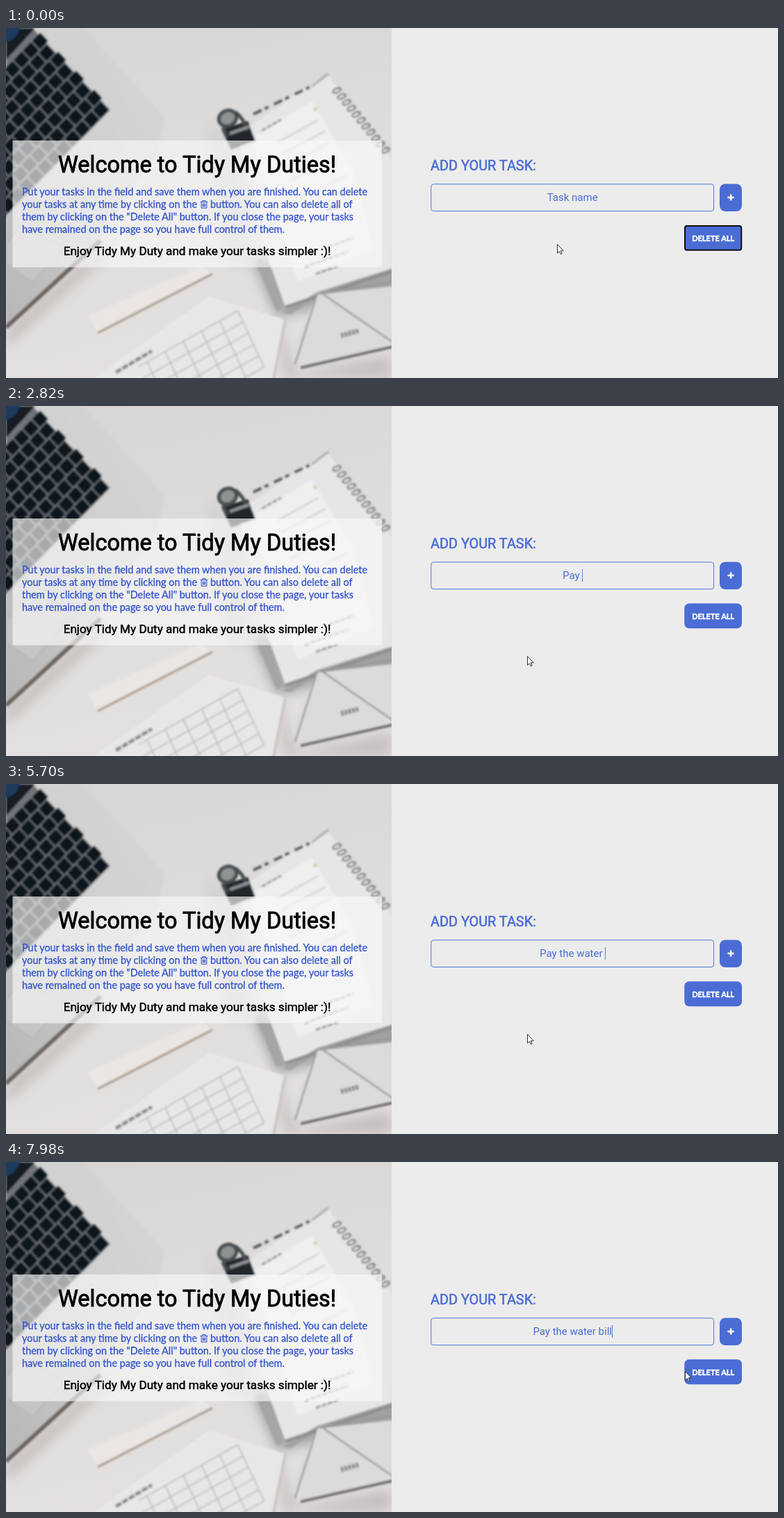
Animation of 1111 by 504 pixels, one loop 8 s. Source, as an HTML page:

```html
<!DOCTYPE html>
<html lang="en">
<head>
<meta charset="utf-8">
<title>Task list</title>
<style>
html, body { margin: 0; width: 100%; height: 100%; overflow: hidden; background: #ececec; }
svg { display: block; width: 1111px; height: 504px; }
text { white-space: pre; }
.rob { font-family: Roboto, sans-serif; }
.lato { font-family: Lato, sans-serif; }
.title { font-size: 32.5px; text-anchor: middle; stroke: #000; stroke-width: .85px; }
.foot { font-size: 17.15px; text-anchor: middle; stroke: #000; stroke-width: .45px; }
.body { font-size: 14.45px; fill: #3454cc; stroke: #3454cc; stroke-width: .3px; }
.head { font-size: 19.85px; fill: #4a6cd4; stroke: #4a6cd4; stroke-width: .55px; }
.entry { font-size: 15px; fill: #4a6cd4; text-anchor: middle; }
.all { font-size: 11px; font-weight: 700; fill: #fff; stroke: #fff; stroke-width: .4px; text-anchor: middle; }
</style>
</head>
<body>
<svg viewBox="0 0 1111 504" xmlns="http://www.w3.org/2000/svg">
  <defs>
    <clipPath id="half"><rect width="555" height="504"/></clipPath>
    <filter id="soft" filterUnits="userSpaceOnUse" x="-30" y="-30" width="620" height="570"><feGaussianBlur stdDeviation="1.5"/></filter>
    <filter id="haze" filterUnits="userSpaceOnUse" x="-60" y="-60" width="680" height="630"><feGaussianBlur stdDeviation="9"/></filter>
    <linearGradient id="desk" x1="0" y1="0" x2=".25" y2="1">
      <stop offset="0" stop-color="#d7d5d4"/>
      <stop offset=".5" stop-color="#dfdddb"/>
      <stop offset="1" stop-color="#e3e0df"/>
    </linearGradient>
    <linearGradient id="metal" x1="0" y1="1" x2="1" y2="0">
      <stop offset="0" stop-color="#b6b6b7"/>
      <stop offset=".6" stop-color="#d0d0d0"/>
      <stop offset="1" stop-color="#d8d7d6"/>
    </linearGradient>
  </defs>
  <rect width="1111" height="504" fill="#ececec"/>

  <g clip-path="url(#half)">
    <rect width="555" height="504" fill="url(#desk)"/>
    <g filter="url(#haze)">
      <path d="M0 436L140 310 150 322 0 460Z" fill="#c3bdb9"/>
      <path d="M352 330L390 416 555 380V310Z" fill="#a4a3a4"/>
      <path d="M385 400L418 498 555 470V504H400Z" fill="#c4c0be"/>
      <path d="M290 130L340 190 350 340 320 340Z" fill="#d0cecd"/>
    </g>
    <g filter="url(#soft)">
      <path d="M0 0H112L228 128 218 178 132 306 0 430Z" fill="url(#metal)"/>
      <path d="M0 431L136 306" stroke="#6c635d" stroke-width="6"/>
      <path d="M0 310L22 286 84 316 38 366 0 340Z" fill="#c5c5c6" stroke="#a9a9aa"/>
      <path d="M0 0H38L150 118 0 270Z" fill="#70757a"/>
      <path d="M0 0H42L0 46Z" fill="#121b23"/>
      <g id="keys" transform="matrix(-.7 .72 -.68 -.72 148 118)" fill="#0d171e"/>
      <circle cx="-4" cy="-4" r="24" fill="#1f3a5f"/>

      <path d="M334 152L462 66 556 190V352L402 402 376 330Z" fill="#e6e6e6"/>
      <path d="M398 410L448 380 556 346V396L452 384 410 412Z" fill="#a3a2a3"/>
      <path d="M402 402L556 350" stroke="#8f8e8f" stroke-width="5"/>
      <path d="M364 335L394 406" stroke="#a5a4a4" stroke-width="10"/>
      <path d="M350 160L440 106 500 205 530 320 420 365Z" fill="#efefef"/>
      <path d="M356 124L440 84" stroke="#55585b" stroke-width="4" stroke-dasharray="13 5 6 9"/>
      <path d="M440 84L464 66" stroke="#a8a8a8" stroke-width="3"/>
      <path d="M368 148L396 132M462 262L480 257M456 318L500 302M430 344L492 322M446 354L480 342" stroke="#909293" stroke-width="3" stroke-dasharray="7 2"/>
      <path d="M390 165L450 132M396 182L460 148M402 199L468 164M410 220L476 185M418 250L490 212" stroke="#cfcfcf" stroke-width="2"/>
      <circle cx="445" cy="117" r="3" fill="#d8cdb8"/>
      <g id="rings" fill="none" stroke="#707275" stroke-width="2.2"/>

      <path d="M448 384L556 372V458L424 489 410 466Z" fill="#dddbda"/>
      <path d="M448 382L416 484M452 380L492 408 556 452M452 382L556 366" fill="none" stroke="#989697" stroke-width="2.5"/>
      <path d="M424 489L556 459" stroke="#6c6865" stroke-width="4"/>
      <path d="M482 443L508 436" stroke="#87888a" stroke-width="7" stroke-dasharray="4 1.5"/>

      <path d="M116 412L278 340 297 354 132 438Z" fill="#e9e6e4"/>
      <path d="M132 439L297 354" stroke="#a5917f" stroke-width="3"/>
      <path d="M121 412L280 342" stroke="#c6c2be" stroke-width="4" stroke-dasharray="1 5"/>

      <path d="M118 510L292 387 402 420 384 510Z" fill="#e8e7e8"/>
      <path d="M402 420L384 510" stroke="#c9c5c3" stroke-width="4"/>
      <g id="grid" transform="matrix(.87 -.49 .42 .9 190 488)" stroke="#bcbcc1" stroke-width="1.8"/>
      <path d="M158 496L210 465" stroke="#88898d" stroke-width="5" stroke-dasharray="9 2"/>

      <path d="M310 146L348 134 359 163 324 175Z" fill="#24282a"/>
      <g fill="#8f9394" stroke="#454b4e" stroke-width="5">
        <ellipse cx="319" cy="130" rx="13" ry="11" transform="rotate(-25 319 130)"/>
        <path d="M312 143L318 157M330 121Q344 132 346 147" fill="none"/>
      </g>
      <path d="M322 152L350 142" stroke="#8d9496" stroke-width="4"/>
    </g>
    <rect x="9.5" y="162" width="531.5" height="182.5" fill="#f8f8f8" fill-opacity=".66"/>
  </g>

  <text class="rob title" x="275" y="208">Welcome to Tidy My Duties!</text>
  <g class="lato body">
    <text x="23" y="241">Put your tasks in the field and save them when you are finished. You can delete</text>
    <text x="23" y="259">your tasks at any time by clicking on the</text>
    <text x="294" y="259">button. You can also delete all of</text>
    <text x="23" y="277">them by clicking on the "Delete All" button. If you close the page, your tasks</text>
    <text x="23" y="295">have remained on the page so you have full control of them.</text>
  </g>
  <path d="M279.5 250.5H290.5M283 250V248.5H287V250M281.2 251V259.2H288.8V251M283.5 252.5V257.5M285 252.5V257.5M286.5 252.5V257.5" fill="none" stroke="#3454cc" stroke-width="1.1"/>
  <text class="rob foot" x="275" y="327">Enjoy Tidy My Duty and make your tasks simpler :)!</text>

  <text class="rob head" x="611" y="205">ADD YOUR TASK:</text>
  <rect x="611.8" y="224.8" width="406.8" height="38.8" rx="3.5" fill="none" stroke="#5079d4"/>
  <text id="entry" class="rob entry" x="815.2" y="249"></text>
  <rect id="caret" y="235" width="1" height="18" fill="#4a6cd4" fill-opacity=".85"/>
  <rect x="1027" y="224.5" width="32" height="39.5" rx="8" fill="#4a6cd4"/>
  <path d="M1038.5 244H1047.7M1043.1 239.4V248.6" stroke="#fff" stroke-width="2.5"/>
  <rect id="button" x="976.3" y="284.3" width="82.7" height="36" rx="7" fill="#4a6cd4"/>
  <rect id="focus" x="977" y="285" width="81.3" height="34.8" rx="3" fill="#4a6cd4" stroke="#0b0d14" stroke-width="2"/>
  <text class="lato all" x="1017.7" y="306.7">DELETE ALL</text>
  <path id="pointer" d="M.5 .5V13.2L3.4 10.6 5.3 14.7 7.1 13.9 5.3 9.8H9.2Z" fill="#fff" stroke="#20222a" stroke-width=".95"/>
</svg>
<script>
const $ = id => document.getElementById(id);
const LOOP = 8000, CENTER = 815.5;

function add(parent, tag, attrs) {
  const el = document.createElementNS("http://www.w3.org/2000/svg", tag);
  for (const name in attrs) el.setAttribute(name, attrs[name]);
  parent.appendChild(el);
}

// still scenery built from repeats
for (let row = 0; row < 8; row++)
  for (let col = 0; col < 17; col++)
    add($("keys"), "rect", { x: col * 19 - (row % 2) * 5, y: row * 19, width: 17.2, height: 17.2, rx: 2 });
for (let i = 0; i < 11; i++) {
  const cx = 476 + i * 7, cy = 90 + i * 8.6;
  add($("rings"), "ellipse", { cx, cy, rx: 6, ry: 3, transform: `rotate(-22 ${cx} ${cy})` });
}
for (let i = 0; i < 6; i++) {
  add($("grid"), "path", { d: `M0 ${i * 18}H165` });
  add($("grid"), "path", { d: `M${15 + i * 30} 0V90` });
}

// typing, with two slips corrected on the way
const typed = [
  [1480, "P"], [1750, "Pa"], [1950, "Pay"], [2150, "Pay "], [2350, "Pay r"], [2820, "Pay "],
  [3170, "Pay t"], [3300, "Pay th"], [3510, "Pay the"], [3630, "Pay the "],
  [4090, "Pay the w"], [4220, "Pay the wa"], [4350, "Pay the war"], [4970, "Pay the wa"],
  [5300, "Pay the wat"], [5450, "Pay the wate"], [5570, "Pay the water"], [5700, "Pay the water "],
  [5970, "Pay the water b"], [6160, "Pay the water bi"], [6360, "Pay the water bil"], [6490, "Pay the water bill"]
];
const caretOff = [[0, 430], [930, 1410], [2960, 3170], [4910, 4970], [6970, 7470]];

const stepped = (t, start, gap, count) =>
  t < start ? 0 : Math.min(count, Math.floor((t - start) / gap) + 1) / count;
const mix = (a, b, p) => a + (b - a) * p;

function pointerAt(t) {
  const out = stepped(t, 70, 75, 8), back = stepped(t, 7300, 68, 11);
  const a = 1 - (1 - out) ** 2, b = back * back * (3 - 2 * back);
  return [mix(mix(793, 750, a), 977, b), mix(mix(311, 360, a), 301, b)];
}

let shown = null;
function draw(t) {
  let value = "";
  for (const [at, text] of typed) if (t >= at) value = text;
  const label = value || "Task name";
  if (label !== shown) $("entry").textContent = shown = label;
  const width = value ? $("entry").getComputedTextLength() : 0;
  $("caret").setAttribute("x", Math.round(CENTER + width / 2 - .5));
  const hidden = caretOff.some(([from, to]) => t >= from && t < to);
  $("caret").setAttribute("visibility", hidden ? "hidden" : "visible");
  const focused = t < 430;
  $("focus").setAttribute("visibility", focused ? "visible" : "hidden");
  $("button").setAttribute("visibility", focused ? "hidden" : "visible");
  $("pointer").setAttribute("transform", `translate(${pointerAt(t).map(Math.round)})`);
}

const begin = performance.now();
function tick() {
  draw((performance.now() - begin) % LOOP);
  requestAnimationFrame(tick);
}
tick();
</script>
</body>
</html>
```
